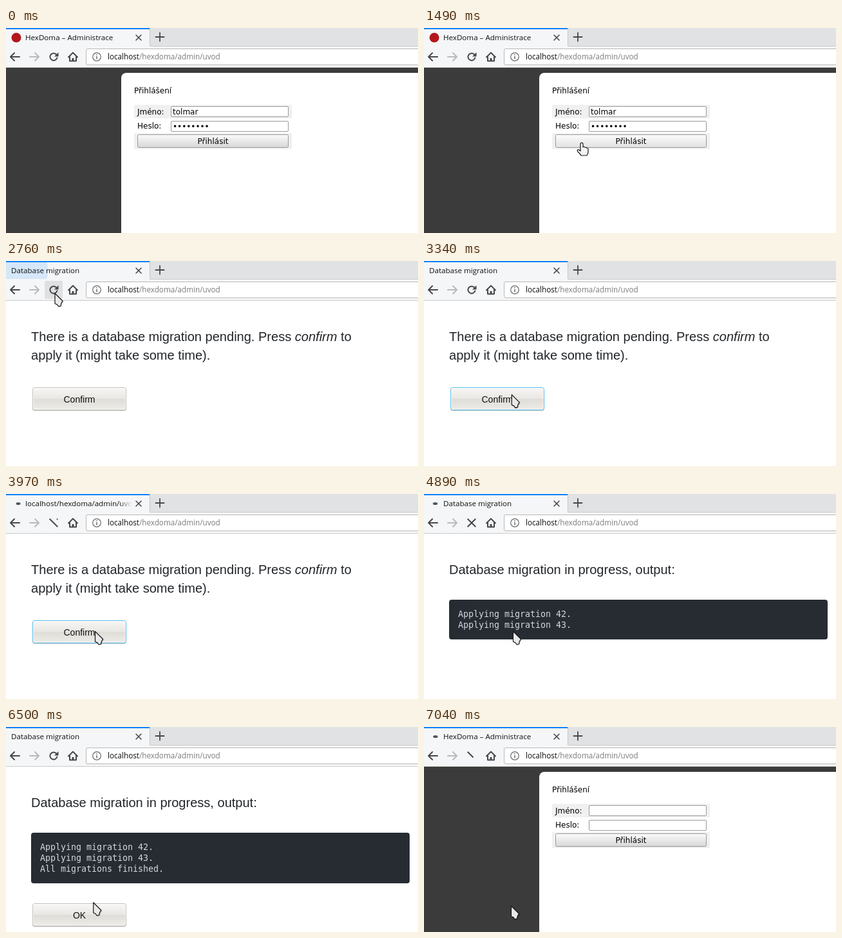
These frames come from a looping animation (640x320 px, 7.08 s). An HTML page:

```html
<!DOCTYPE html>
<html lang="cs">
<head>
<meta charset="utf-8">
<title>Database migration</title>
<style>
  html, body { margin: 0; width: 100%; height: 100%; overflow: hidden; background: #fff; }
  svg { display: block; width: 640px; height: 320px; }
  text { white-space: pre; }
  .ui { font: 11.6px "Open Sans", sans-serif; fill: #111; }
  .url { font: 11.7px "Open Sans", sans-serif; fill: #7c7c7d; }
  .form { font: 12px "DejaVu Sans", sans-serif; fill: #000; }
  .lead { font: 20.05px "Liberation Sans", sans-serif; fill: #212529; }
  .label { font: 14px "Liberation Sans", sans-serif; fill: #111; text-anchor: middle; }
  .mono { font: 13.3px "DejaVu Sans Mono", monospace; fill: #d3d8de; }
  .icon { fill: none; stroke: #47474a; stroke-width: 2; stroke-linecap: round; stroke-linejoin: round; }
</style>
</head>
<body>
<svg viewBox="0 0 640 320">
  <defs>
    <linearGradient id="plain" x2="0" y2="1">
      <stop stop-color="#fbfbfb"/><stop offset="1" stop-color="#d7d7d7"/>
    </linearGradient>
    <linearGradient id="warm" x2="0" y2="1">
      <stop stop-color="#f8f7f6"/><stop offset=".5" stop-color="#e9e7e3"/>
      <stop offset=".52" stop-color="#dfddd7"/><stop offset="1" stop-color="#eeece9"/>
    </linearGradient>
    <linearGradient id="fade">
      <stop stop-color="#f5f6f7" stop-opacity="0"/><stop offset="1" stop-color="#f5f6f7"/>
    </linearGradient>
    <clipPath id="tabClip"><rect width="210" height="28"/></clipPath>
  </defs>

  <rect width="640" height="320" fill="#fff"/>

  <g id="login">
    <rect y="62" width="640" height="258" fill="#3b3b3b"/>
    <rect x="179" y="70" width="480" height="270" rx="8" fill="#fff"/>
    <path d="M199 120h245v21h-245zM199 164h245v25h-245z" fill="#f0f0f0"/>
    <g class="form">
      <text x="199" y="102">Přihlášení</text>
      <text x="204" y="135">Jméno:</text>
      <text x="204" y="157">Heslo:</text>
      <g fill="#fff" stroke="#999">
        <rect x="256.5" y="122.5" width="182" height="16" rx="1.5"/>
        <rect x="256.5" y="145.5" width="182" height="16" rx="1.5"/>
      </g>
      <g id="filled">
        <text x="259" y="135">tolmar</text>
        <text x="259" y="158">••••••••</text>
      </g>
      <rect x="204.5" y="166.5" width="234" height="20" rx="2" fill="url(#plain)" stroke="#999"/>
      <rect id="loginHover" x="205" y="167" width="233" height="19" fill="#fff" opacity=".25"/>
      <text x="321.5" y="181" text-anchor="middle">Přihlásit</text>
    </g>
  </g>

  <g id="pending">
    <text class="lead" x="39" y="125">There is a database migration pending. Press <tspan font-style="italic">confirm</tspan> to</text>
    <text class="lead" x="39" y="154">apply it (might take some time).</text>
    <g id="confirm"></g>
  </g>

  <g id="progress">
    <text class="lead" x="39" y="125">Database migration in progress, output:</text>
    <rect id="output" x="39" y="165" width="588" height="45" rx="4" fill="#272c33"/>
    <g class="mono">
      <text x="53" y="192">Applying migration 42.</text>
      <text id="line2" x="53" y="209">Applying migration 43.</text>
      <text id="line3" x="53" y="226">All migrations finished.</text>
    </g>
    <g id="ok"></g>
  </g>

  <g id="browser">
    <rect width="640" height="29" fill="#e1e2e4"/>
    <rect y="28" width="640" height="33" fill="#f5f6f7"/>
    <path d="M0 61.5h640M223.5 28.5H640" stroke="#cbcbcc"/>
    <rect width="223" height="29" fill="#f5f6f7"/>
    <path d="M223.5 0v28" stroke="#c4c5c7"/>
    <circle id="burst" cx="16" cy="15" fill="#0a84ff" clip-path="url(#tabClip)"/>
    <rect width="223" height="2" fill="#0a84ff"/>
    <circle id="favicon" cx="16" cy="15" r="7.5" fill="#b3161b"/>
    <ellipse id="spinner" cy="15" ry="2" fill="#4f5560"/>
    <text id="title" class="ui" y="19"></text>
    <rect x="176" y="5" width="20" height="20" fill="url(#fade)"/>
    <rect x="196" y="5" width="26" height="20" fill="#f5f6f7"/>
    <path class="icon" stroke-width="1.5" d="M202 11l8 8m0-8l-8 8" style="stroke-width:1.6"/>
    <path class="icon" d="M232.5 14h13M239 7.5v13" style="stroke-width:1.8"/>
    <rect id="reloadBg" x="60" y="31" width="28" height="28" rx="2"/>
    <path class="icon" d="M21 45H7.500M13 39l-6 6 6 6"/>
    <path class="icon" d="M37 45h13.500M45 39l6 6-6 6" style="stroke:#b9babb"/>
    <g id="reload">
      <path class="icon" d="M79.400 46.500A5.600 5.600 0 1 1 77.800 40.900"/>
      <path d="M81.500 38v6.500H75z" fill="#47474a"/>
    </g>
    <path id="stroke1" class="icon"/>
    <path id="stroke2" class="icon"/>
    <path class="icon" d="M97 45.500l7-7 7 7M99 45v6.500h10V45"/>
    <path d="M102.500 47h3v5h-3z" fill="#47474a"/>
    <rect x="124.500" y="32.500" width="530" height="25" rx="2.500" fill="#fff" stroke="#b8b8b9"/>
    <circle cx="141" cy="45" r="6.300" fill="none" stroke="#68686a" stroke-width="1.200"/>
    <path d="M141 44v4.500M141 41v1.500" stroke="#68686a" stroke-width="1.500"/>
    <text class="url" x="158" y="49"><tspan fill="#0c0c0d">localhost</tspan>/hexdoma/admin/uvod</text>
  </g>

  <g id="cursor" stroke="#161616" stroke-width="1.200" stroke-linejoin="round">
    <g id="arrow">
      <path d="M1 1.500v16l3 1.500 2 3 4-1 1-4 3-4z" fill="#000" stroke="none" opacity=".2"/>
      <path d="M0 0V16L3.500 17.500 5.500 20.500 9 19.500 9.800 15.500 12 12Z" fill="#e9e9e9"/>
    </g>
    <path id="hand" fill="#f4f4f4" d="M-2 2Q-2 .200 0 .200T2 2V7Q4 5.700 5 7.500 7 6.700 8 8.500 10 8.300 10 10.500V14Q10 17 8 20H-1Q-2.500 17-6.200 14-7.500 11.600-6 11-4.500 10.600-2 13Z"/>
  </g>
</svg>
<script>
const LOOP = 7080;
const SITE = "HexDoma – Administrace";
const ADDRESS = "localhost/hexdoma/admin/uvod";
const MIGRATION = "Database migration";

const LOADS = [[2290, 2680], [3780, 5860], [6890, LOOP]];
const TITLES = [[0, SITE], [2560, MIGRATION], [3780, ADDRESS], [4080, MIGRATION], [6890, ADDRESS], [7000, SITE]];
const PAGES = [[0, "login"], [2560, "pending"], [4080, "progress"], [7000, "login"]];

const smooth = p => (1 - Math.cos(Math.PI * p)) / 2;
const settle = p => Math.sin(Math.PI * p / 2);
// start, end, from, to, easing
const MOVES = [
  [1490, 2090, [245, 179], [76, 50.5], smooth],
  [2765, 3460, [76, 50.5], [138.5, 214.5], settle],
  [6160, 6580, [138.5, 214.5], [135.5, 279.5], smooth]
];

const $ = id => document.getElementById(id);
const clamp = p => Math.max(0, Math.min(1, p));
const set = (id, attrs) => { for (const k in attrs) $(id).setAttribute(k, attrs[k]); };
const show = (id, on) => $(id).style.display = on ? "" : "none";
const within = (t, a, b) => t >= a && t < b;
const latest = (table, t) => table.filter(row => row[0] <= t).pop()[1];

function addButton(id, y, label) {
  $(id).innerHTML = `
    <rect x="41" y="${y + 1}" width="146" height="36" rx="4" fill="#aaa" opacity=".7"/>
    <rect id="${id}Face" x="41.5" y="${y + .5}" width="145" height="35" rx="3.5"/>
    <rect x="42.5" y="${y + 1.5}" width="143" height="33" rx="2.5" fill="none" stroke="#fff" opacity=".6"/>
    <text class="label" x="114" y="${y + 24}">${label}</text>`;
}

function paintButton(id, hover, pressed) {
  set(id + "Face", { fill: pressed ? "#d8d5cf" : "url(#warm)", stroke: hover ? "#59bdea" : "#c3c1bd" });
}

function cursorAt(t) {
  const move = MOVES.filter(m => m[0] <= t).pop();
  if (!move) return null;
  const [start, end, from, to, ease] = move;
  const p = ease(clamp((t - start) / (end - start)));
  return from.map((v, i) => v + (to[i] - v) * p);
}

function drawCursor(t) {
  const pos = cursorAt(t);
  show("cursor", pos);
  const [x, y] = pos || [0, 0];
  const onLogin = t < 2560 && x > 204 && y > 166;
  const onReload = pos && within(x, 60, 88) && within(y, 31, 59);
  show("hand", onLogin);
  show("arrow", !onLogin);
  show("loginHover", onLogin);
  show("reloadBg", onReload);
  set("reloadBg", { fill: within(t, 2210, 2290) ? "#cbccce" : "#dfe0e2" });
  set("cursor", { transform: `translate(${x} ${y})` });
  paintButton("confirm", y > 197, within(t, 3680, 3780));
  paintButton("ok", y > 275, within(t, 6740, 6860));
}

function drawStroke(id, x, y, dx, p) {
  show(id, p > 0);
  set(id, { d: `M${x} ${y}l${dx * p} ${11.5 * p}` });
}

function drawTab(t) {
  const load = LOADS.find(([a, b]) => within(t, a, b));
  const title = latest(TITLES, t);
  show("spinner", load);
  show("favicon", !load && title === SITE);
  $("title").textContent = title;
  set("title", { x: load || title === SITE ? 30 : 8 });

  if (load) {
    const angle = 2 * Math.PI * (t - load[0]) / 970 - .65;
    set("spinner", { cx: 16 + 5.5 * Math.sin(angle), rx: 2 + 1.8 * Math.abs(Math.cos(angle)) });
  }

  const ended = LOADS.find(([, b]) => within(t, b, b + 320));
  const grow = ended ? (t - ended[1]) / 320 : 0;
  set("burst", { r: 194 * grow, opacity: ended ? .18 * (1 - grow) : 0 });

  // The short reload keeps its arrow; longer loads turn it into a cross.
  const age = load && load[0] > 3000 ? t - load[0] : -1;
  set("reload", { opacity: age < 0 ? 1 : clamp(1 - age / 80) });
  drawStroke("stroke1", 68.200, 39.300, 11.500, clamp((age - 80) / 105));
  drawStroke("stroke2", 79.700, 39.300, -11.500, clamp((age - 190) / 110));
}

function drawPage(t) {
  const page = latest(PAGES, t);
  for (const id of ["login", "pending", "progress"]) show(id, id === page);
  show("filled", t < 2560);
  const lines = 1 + (t >= 4750) + (t >= 5450);
  set("output", { height: 28 + 17 * lines });
  show("line2", lines > 1);
  show("line3", lines > 2);
  show("ok", lines > 2);
}

function frame() {
  const t = performance.now() % LOOP;
  drawPage(t);
  drawTab(t);
  drawCursor(t);
  requestAnimationFrame(frame);
}

addButton("confirm", 197, "Confirm");
addButton("ok", 275, "OK");
frame();
</script>
</body>
</html>
```
